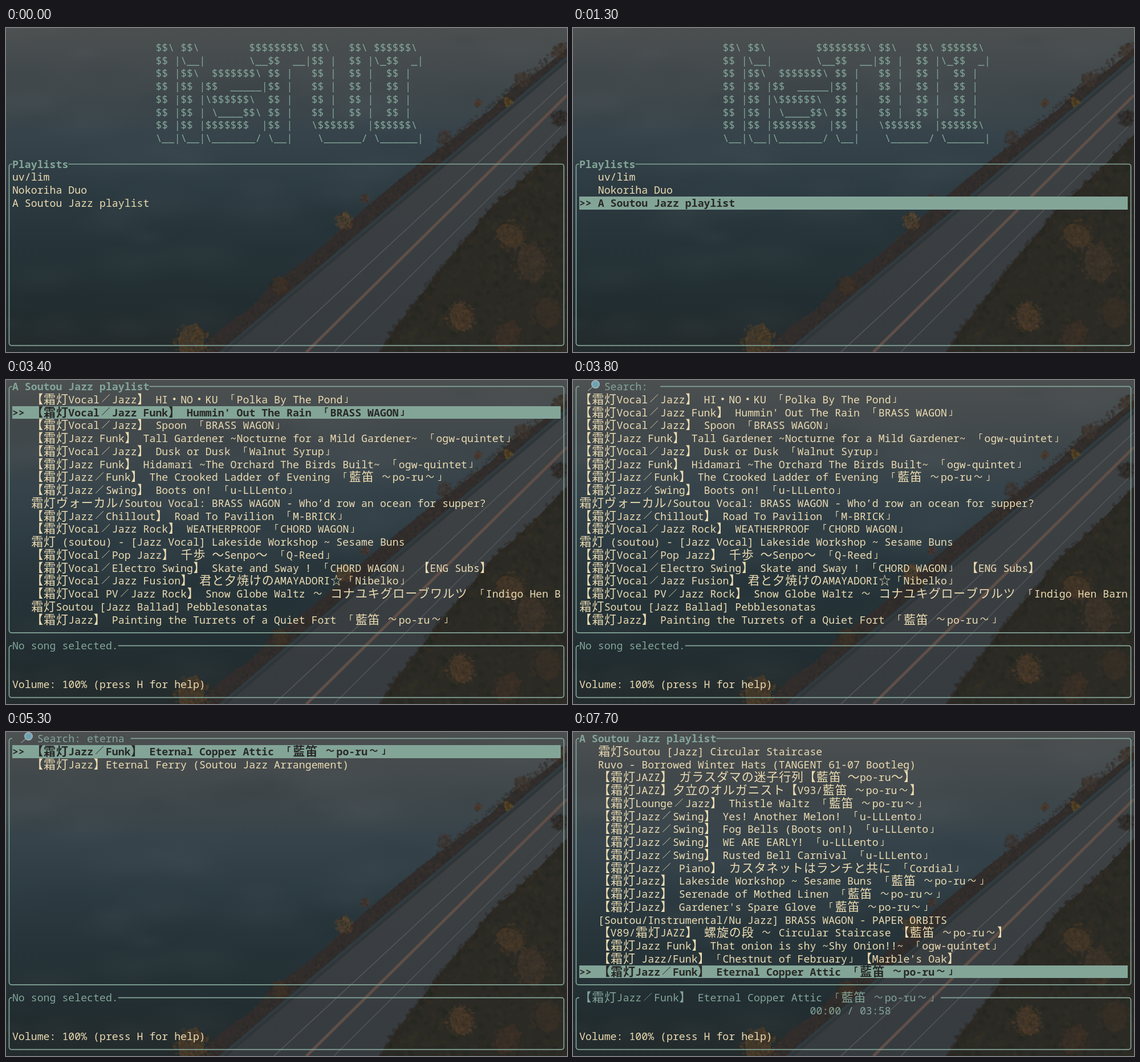
Write an HTML page with a canvas that moves like this. It is 984 px wide and 569 px high and loops after 8 s.

```html
<!DOCTYPE html>
<html lang="en">
<head>
<meta charset="utf-8">
<title>Terminal music player</title>
<style>
  html, body { margin: 0; width: 100%; height: 100%; overflow: hidden; background: #2c3a41; }
  canvas { display: block; }
</style>
</head>
<body>
<canvas id="stage" width="984" height="569"></canvas>
<script>
const WIDTH = 984, HEIGHT = 569, COL = WIDTH / 90, ROW = HEIGHT / 25;
const LOOP = 8000, PAGE = 18;
const ACCENT = "#83a598", TEXT = "#ebdbb2", DARK = "#282828";
const stage = document.getElementById("stage");
const ctx = stage.getContext("2d");

const playlists = ["uv/lim", "Nokoriha Duo", "A Soutou Jazz playlist"];
const favourite = "【霜灯Jazz／Funk】 Eternal Copper Attic 「藍笛 ～po-ru～」";
const songs = [
  "【霜灯Vocal／Jazz】 HI・NO・KU 「Polka By The Pond」",
  "【霜灯Vocal／Jazz Funk】 Hummin' Out The Rain 「BRASS WAGON」",
  "【霜灯Vocal／Jazz】 Spoon 「BRASS WAGON」",
  "【霜灯Jazz Funk】 Tall Gardener ~Nocturne for a Mild Gardener~ 「ogw-quintet」",
  "【霜灯Vocal／Jazz】 Dusk or Dusk 「Walnut Syrup」",
  "【霜灯Jazz Funk】 Hidamari ~The Orchard The Birds Built~ 「ogw-quintet」",
  "【霜灯Jazz／Funk】 The Crooked Ladder of Evening 「藍笛 ～po-ru～」",
  "【霜灯Jazz／Swing】 Boots on! 「u-LLLento」",
  "霜灯ヴォーカル/Soutou Vocal: BRASS WAGON - Who’d row an ocean for supper?",
  "【霜灯Jazz／Chillout】 Road To Pavilion 「M-BRICK」",
  "【霜灯Vocal／Jazz Rock】 WEATHERPROOF 「CHORD WAGON」",
  "霜灯 (soutou) - [Jazz Vocal] Lakeside Workshop ~ Sesame Buns",
  "【霜灯Vocal／Pop Jazz】 千歩 〜Senpo〜 「Q-Reed」",
  "【霜灯Vocal／Electro Swing】 Skate and Sway ! 「CHORD WAGON」 【ENG Subs】",
  "【霜灯Vocal／Jazz Fusion】 君と夕焼けのAMAYADORI☆「Nibelko」",
  "【霜灯Vocal PV／Jazz Rock】 Snow Globe Waltz ～ コナユキグローブワルツ 「Indigo Hen Barn」",
  "霜灯Soutou [Jazz Ballad] Pebblesonatas",
  "【霜灯Jazz】 Painting the Turrets of a Quiet Fort 「藍笛 ～po-ru～」",
  "【霜灯Violin／Jazz Metal】 Beneath the Awning 「Lumber Chorus」",
  "【霜灯爆音ジャズ】VRX版 霜灯深々鏡～遠浅渡白鷺帳【北町オルゴールDUETs＆カラメルP】",
  "【霜灯爆音ジャズ】VRX版ペーパーランタンズ 〜銀砂宵灯2014【北町オルゴールDUETs＆カラメルP】",
  "po-ru - Mustard Promenade ~ Coastal Sleep... [Trumpet]",
  "Soutou Anime PVD2 #5 - Clarinette?【霜灯V80】",
  "霜灯Soutou [Jazz] Circular Staircase",
  "Ruvo - Borrowed Winter Hats (TANGENT 61-07 Bootleg)",
  "【霜灯JAZZ】 ガラスダマの迷子行列【藍笛 〜po-ru〜】",
  "【霜灯JAZZ】夕立のオルガニスト【V93/藍笛 ～po-ru～】",
  "【霜灯Lounge／Jazz】 Thistle Waltz 「藍笛 ～po-ru～」",
  "【霜灯Jazz／Swing】 Yes! Another Melon! 「u-LLLento」",
  "【霜灯Jazz／Swing】 Fog Bells (Boots on!) 「u-LLLento」",
  "【霜灯Jazz／Swing】 WE ARE EARLY! 「u-LLLento」",
  "【霜灯Jazz／Swing】 Rusted Bell Carnival 「u-LLLento」",
  "【霜灯Jazz／ Piano】 カスタネットはランチと共に 「Cordial」",
  "【霜灯Jazz】 Lakeside Workshop ~ Sesame Buns 「藍笛 ～po-ru～」",
  "【霜灯Jazz】 Serenade of Mothed Linen 「藍笛 ～po-ru～」",
  "【霜灯Jazz】 Gardener's Spare Glove 「藍笛 ～po-ru～」",
  "[Soutou/Instrumental/Nu Jazz] BRASS WAGON - PAPER ORBITS",
  "【V89/霜灯JAZZ】 螺旋の段 ～ Circular Staircase 【藍笛 ～po-ru～】",
  "【霜灯Jazz Funk】 That onion is shy ~Shy Onion!!~ 「ogw-quintet」",
  "【霜灯 Jazz/Funk】「Chestnut of February」【Marble's Oak】",
  favourite,
  "霜灯 [Piano / Jazz] Nocturne for the Quiet Cellist 『7』",
  "Pet Snails Don't Hurry",
  "【霜灯Jazz】 Loom Cabin 「ogw.quintet」",
  "【霜灯Vocal／Funky Pop】 LAMPLIGHTS 「Kometanohikari's」",
  "po-ru - Painting the Turrets of a Quiet Fort [Moss]",
  "po-ru - A.B.Reed met Who? [Trumpet]",
  "BRASS WAGON Vol.04 - Waltz in the Trumpet Attic",
  "[Violet Plaza 77] (QWe-piano) Absentminded Elk",
  "【霜灯Jazz】Eternal Ferry (Soutou Jazz Arrangement)",
];

const banner = String.raw`
$$\ $$\        $$$$$$$$\ $$\   $$\ $$$$$$\
$$ |\__|       \__$$  __|$$ |  $$ |\_$$  _|
$$ |$$\  $$$$$$$\ $$ |   $$ |  $$ |  $$ |
$$ |$$ |$$  _____|$$ |   $$ |  $$ |  $$ |
$$ |$$ |\$$$$$$\  $$ |   $$ |  $$ |  $$ |
$$ |$$ | \____$$\ $$ |   $$ |  $$ |  $$ |
$$ |$$ |$$$$$$$  |$$ |   \$$$$$$  |$$$$$$\
\__|\__|\_______/ \__|    \______/ \______|`.split("\n");

// Each scene holds from its start time until the next one.
const scenes = [
  { at: 0, home: true },
  { at: 600, home: true, selected: 0 },
  { at: 1100, home: true, selected: 1 },
  { at: 1300, home: true, selected: 2 },
  { at: 1800 },
  { at: 2300, selected: 0 },
  { at: 3400, selected: 1 },
  { at: 3800, query: "" },
  { at: 4100, query: "e" },
  { at: 4300, query: "et" },
  { at: 4500, query: "eter" },
  { at: 4600, query: "etern" },
  { at: 4800, query: "eterna" },
  { at: 5300, query: "eterna", selected: 0 },
  { at: 5900, query: "eterna", selected: 1 },
  { at: 6200, query: "eterna", selected: 0 },
  { at: 7700, selected: songs.indexOf(favourite), playing: true },
];

// Writes text on the terminal grid and returns the column after it.
function write(text, col, row, color, bold = false) {
  const weight = bold ? "bold " : "";
  ctx.fillStyle = color;
  for (const [run, wide] of text.matchAll(/([\u2600-\u27bf\u2e80-\uffef])|[^\u2600-\u27bf\u2e80-\uffef]+/g)) {
    const x = col * COL, baseline = row * ROW + 18;
    if (wide) {
      // Full-width punctuation is set smaller, centred in its two cells.
      const size = "～／「」『』".includes(wide) ? 15 : 21;
      ctx.font = `${weight}${size}px "Noto Sans CJK JP", "Noto Sans CJK", sans-serif`;
      ctx.fillText(wide, x + COL - size / 2, baseline - (21 - size) * 0.38);
      col += 2;
    } else {
      ctx.font = `${weight}${COL / 0.6}px "Noto Sans Mono", monospace`;
      ctx.fillText(run, x, baseline);
      col += run.length;
    }
  }
  return col;
}

function drawBox(topRow, bottomRow, titleEnd) {
  const left = COL / 2, right = WIDTH - left;
  const top = (topRow + 0.5) * ROW, bottom = (bottomRow + 0.5) * ROW;
  ctx.strokeStyle = ACCENT;
  ctx.lineWidth = 1.7;
  ctx.beginPath();
  ctx.moveTo(titleEnd * COL, top);
  ctx.arcTo(right, top, right, bottom, 4);
  ctx.arcTo(right, bottom, left, bottom, 4);
  ctx.arcTo(left, bottom, left, top, 4);
  ctx.arcTo(left, top, right, top, 4);
  ctx.lineTo(COL, top);
  ctx.stroke();
}

function drawList(items, topRow, selected) {
  const first = Math.max(0, (selected ?? 0) - PAGE + 1);
  ctx.save();
  ctx.beginPath();
  ctx.rect(COL, 0, 88 * COL, HEIGHT);
  ctx.clip();
  items.slice(first, first + PAGE).forEach((item, i) => {
    const row = topRow + i, active = first + i === selected;
    if (active) {
      const y = Math.round(row * ROW);
      ctx.fillStyle = ACCENT;
      ctx.fillRect(11, y, 962, Math.round((row + 1) * ROW) - y);
      write(">>", 1, row, DARK, true);
    }
    write(item, selected === undefined ? 1 : 4, row, active ? DARK : TEXT, active);
  });
  ctx.restore();
}

function drawMagnifier() {
  const handle = (color, width) => {
    ctx.strokeStyle = color;
    ctx.lineWidth = width;
    ctx.beginPath();
    ctx.moveTo(27, 18.5);
    ctx.lineTo(34, 12.5);
    ctx.stroke();
  };
  ctx.lineCap = "round";
  handle("#4b5052", 4.5);
  handle("#8b9293", 1.5);
  ctx.lineCap = "butt";
  ctx.beginPath();
  ctx.arc(39.5, 7.5, 6.5, 0, 7);
  ctx.fillStyle = "#6ba3b5";
  ctx.fill();
  ctx.strokeStyle = "#a3afb1";
  ctx.lineWidth = 2;
  ctx.stroke();
}

function drawHome({ selected }) {
  banner.forEach((line, row) => write(line, 24, row, ACCENT));
  drawBox(10, 24, write("Playlists", 1, 10, ACCENT, true));
  drawList(playlists, 11, selected);
}

function drawPlayer({ query, selected, playing }) {
  const searching = query !== undefined;
  if (searching) drawMagnifier();
  const titleEnd = searching
    ? write(`Search: ${query} `, 5, 0, ACCENT)
    : write(playlists[2], 1, 0, ACCENT, true);
  drawBox(0, 19, titleEnd);
  drawList(songs.filter(song => song.toLowerCase().includes(query ?? "")), 1, selected);

  drawBox(20, 24, write(playing ? favourite : "No song selected.", 1, 20, ACCENT));
  if (playing) write("00:00 / 03:58", 38, 21, ACCENT);
  write("Volume: 100% (press H for help)", 1, 23, TEXT);
}

// Dimmed aerial view: misty water, a diagonal road and autumn trees.
function paintBackdrop() {
  const canvas = document.createElement("canvas");
  canvas.width = WIDTH;
  canvas.height = HEIGHT;
  const g = canvas.getContext("2d");
  let seed = 7;
  const random = () => (seed = (seed * 16807) % 2147483647) / 2147483647;
  const between = (a, b) => a + (b - a) * random();
  const pick = list => list[Math.floor(random() * list.length)];

  const trace = points => {
    g.beginPath();
    points.forEach(([x, y]) => g.lineTo(x, y));
  };
  const fill = (points, color) => {
    trace(points);
    g.fillStyle = color;
    g.fill();
  };
  const line = (x1, y1, x2, y2, color, width) => {
    trace([[x1, y1], [x2, y2]]);
    g.strokeStyle = color;
    g.lineWidth = width;
    g.stroke();
  };
  const dot = (x, y, r, color, alpha) => {
    g.globalAlpha = alpha;
    g.fillStyle = color;
    g.beginPath();
    g.ellipse(x, y, r, r * 0.75, between(0, 3), 0, 7);
    g.fill();
    g.globalAlpha = 1;
  };
  const crown = (x, y, r, color) => {
    dot(x, y, r * 0.9, color, 0.45);
    for (let i = 0; i < r * 7; i++) {
      const angle = between(0, 6.3), d = r * Math.sqrt(random());
      dot(x + d * Math.cos(angle), y + d * Math.sin(angle), between(1, 3.5), pick([color, color, "#30281f"]), 0.3);
    }
  };

  const water = g.createLinearGradient(0, 0, 0, HEIGHT);
  ["#4b4f50", "#42494c", "#36434a", "#2d3b42", "#263439", "#222e32", "#242b2c"]
    .forEach((color, i) => water.addColorStop(i / 6, color));
  g.fillStyle = water;
  g.fillRect(0, 0, WIDTH, HEIGHT);

  for (let i = 0; i < 70; i++) {
    const r = between(30, 110);
    const mist = g.createRadialGradient(0, 0, 0, 0, 0, r);
    const tone = pick(["130,135,135", "12,24,30"]);
    mist.addColorStop(0, `rgba(${tone},.05)`);
    mist.addColorStop(1, `rgba(${tone},0)`);
    g.save();
    g.translate(between(0, 900), between(0, HEIGHT));
    g.scale(1, 0.4);
    g.fillStyle = mist;
    g.fillRect(-r, -r, 2 * r, 2 * r);
    g.restore();
  }

  // Overgrown bank between the water and the guard rail.
  fill([[984, 36], [935, 76], [890, 104], [850, 144], [800, 182], [755, 215], [690, 266], [630, 316],
    [570, 370], [520, 412], [465, 450], [430, 492], [380, 525], [335, 569], [385, 569], [984, 50]], "#302d2c");
  for (let i = 0; i < 1500; i++) {
    const x = between(345, WIDTH), rail = 50 + (984 - x) * 0.852;
    dot(x, rail - 34 * random() ** 1.5, between(1, 3.5), pick(["#38302c", "#292a29", "#3f342c", "#322d2a"]), 0.45);
  }

  const asphalt = g.createLinearGradient(0, 50, 0, HEIGHT);
  asphalt.addColorStop(0, "#3f4345");
  asphalt.addColorStop(1, "#363b3f");
  fill([[984, 50], [375, 569], [660, 569], [984, 200]], asphalt);
  line(984, 51, 375, 570, "#2d3c42", 3);
  line(984, 57, 384, 569, "#303538", 5);
  line(984, 92, 470, 569, "#55595b", 1.5);
  line(984, 118, 527, 569, "#5f4f48", 5);
  line(984, 163, 575, 569, "#515557", 1.5);

  crown(325, 550, 33, "#604528");
  crown(593, 339, 16, "#624a2e");
  crown(480, 452, 17, "#443629");
  crown(630, 300, 8, "#4b3b35");
  crown(770, 192, 14, "#433835");
  crown(828, 132, 7, "#503d30");
  crown(880, 130, 9, "#654d28");
  crown(905, 90, 13, "#433731");
  crown(972, 40, 13, "#423730");

  const forest = [[984, 187], [935, 238], [890, 282], [850, 316], [815, 362], [775, 408], [735, 460], [690, 518], [655, 569]];
  fill([...forest, [984, 569]], "#2b2a25");
  // Loose foliage softens the edge of the wood.
  forest.slice(1).forEach(([x, y], i) => {
    const [px, py] = forest[i];
    for (let n = 0; n < 45; n++) {
      const t = random();
      dot(px + (x - px) * t + between(-4, 9), py + (y - py) * t + between(-4, 9), between(2, 5), "#2d2924", 0.45);
    }
  });
  g.save();
  trace([...forest, [984, 569]]);
  g.clip();
  for (let i = 0; i < 1800; i++) {
    dot(between(650, WIDTH), between(185, HEIGHT), between(2, 7),
      pick(["#22251f", "#2e2f23", "#332f29", "#292822", "#383127"]), 0.35);
  }
  crown(885, 365, 28, "#523e2a");
  crown(922, 412, 36, "#46382d");
  crown(798, 508, 27, "#59422d");
  crown(950, 500, 30, "#3e3329");
  crown(880, 540, 28, "#433429");
  g.restore();
  crown(970, 158, 15, "#2b2624");
  return canvas;
}

const backdrop = paintBackdrop();
let shown;

function frame(now) {
  const time = now % LOOP;
  const scene = scenes.findLast(({ at }) => time >= at);
  if (scene !== shown) {
    shown = scene;
    ctx.drawImage(backdrop, 0, 0);
    (scene.home ? drawHome : drawPlayer)(scene);
  }
  requestAnimationFrame(frame);
}
frame(0);
</script>
</body>
</html>
```
